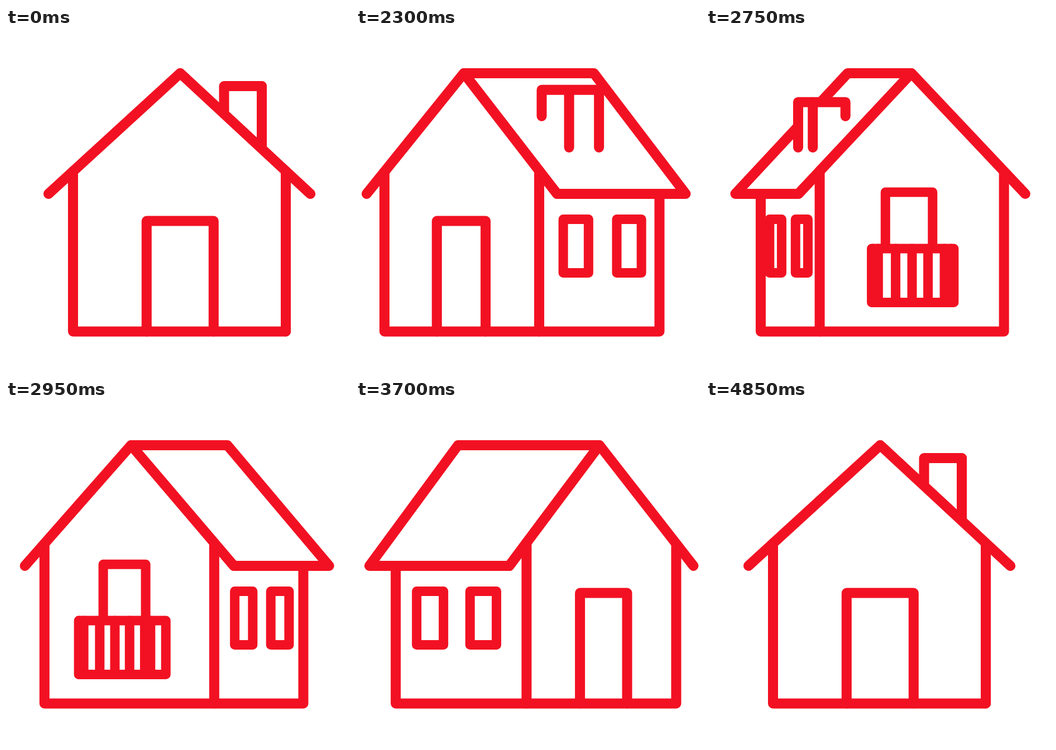
Write an HTML page with a canvas that moves like this. It is 616 px wide and 616 px high and loops after 4.87 s.

```html
<!DOCTYPE html>
<html lang="en">
<head>
<meta charset="utf-8">
<title>Turning house</title>
<style>
  html, body { margin: 0; width: 100%; height: 100%; overflow: hidden; background: #fff; }
  canvas { display: block; width: 616px; height: 616px; }
</style>
</head>
<body>
<canvas id="stage" width="616" height="616"></canvas>
<script>
const g = document.getElementById("stage").getContext("2d");
const LOOP = 4870, REST = 2020;
const RED = "#f21122";
const RIDGE = 81, EAVE = 297, FLOOR = 543.5;
const lerp = (a, b, k) => a + (b - a) * k;

// cubic-bezier(.26, .1, .24, 1)
function ease(x) {
  if (x <= 0) return 0;
  if (x >= 1) return 1;
  const curve = (s, a, b) => 3 * (1 - s) * (1 - s) * s * a + 3 * (1 - s) * s * s * b + s * s * s;
  let lo = 0, hi = 1;
  for (let i = 0; i < 30; i++) {
    const mid = (lo + hi) / 2;
    if (curve(mid, .26, .24) < x) lo = mid; else hi = mid;
  }
  return curve(lo, .1, 1);
}

// Turn in quarters, 0 to 4, advancing in 25 ms steps
function turnAt(ms) {
  if (ms < REST) return 0;
  const step = Math.floor((Math.floor(ms / 10) * 10 - REST) / 25);
  const t = REST + 5 + step * 25;
  if (t >= 4850) return 0;
  // A slight rush as the side comes into view
  const rush = .161 * Math.exp(-(((t - 2550) / 220) ** 2));
  return Math.min(3.9999, 4 * ease((t - 2015) / 2810) + rush);
}

function shape(points, { fill = false, stroke = true, close = false, width = 18 } = {}) {
  g.beginPath();
  points.forEach(([x, y], i) => i ? g.lineTo(x, y) : g.moveTo(x, y));
  if (close) g.closePath();
  if (fill) g.fill();
  g.lineWidth = width;
  if (stroke) g.stroke();
}

const box = (x1, y1, x2, y2) => [[x1, y1], [x2, y1], [x2, y2], [x1, y2]];

function draw(turn) {
  g.fillStyle = "#fff";
  g.strokeStyle = RED;
  g.lineCap = g.lineJoin = "round";
  g.fillRect(0, 0, 616, 616);

  const quarter = Math.floor(turn);
  const m = turn % 2, q = m < 1 ? m : 2 - m;    // 0: gable faces us, 1: side does
  const side = quarter % 2 ? 1 : -1;            // where the near gable stands
  const frontNear = quarter < 1 || quarter > 2;
  const c = 310.5 - 1.5 * Math.min(1, 2 * q);
  const across = q < .5 ? 1 - .656 * q : 1.344 * (1 - q);
  const depth = (half, full) => q < .5 ? half * 2 * q : lerp(half, full, 2 * q - 1);

  const eaveW = 234.5 * across, wallW = 190.5 * across;
  const lean = 1.5 * Math.max(0, 1 - 2 * q);
  const ridge = depth(140, 181);
  const apex = c + lean + side * ridge, farApex = c + lean - side * ridge;
  const eaveMid = c + side * depth(144, 264);
  const wallMid = c + side * depth(144, 223);
  const eaveIn = eaveMid - side * eaveW, eaveOut = eaveMid + side * eaveW;
  const wallIn = wallMid - side * wallW, wallOut = wallMid + side * wallW;
  const farEave = c - side * (depth(133, 264) + eaveW);
  const farMid = c - side * depth(115, 223);
  const farWall = farMid - side * wallW;

  function chimney() {
    const cos = frontNear ? across : -across;
    const sin = (turn < 2 ? 1 : -1) * depth(.7, 1);
    const at = (x, z) => c + x * cos - z * sin;
    const top = turn < 2 ? 104 + 16 * turn : turn < 3 ? 24 + 56 * turn : 104 + 67 * q;
    const [near, far] = turn < 1 ? [60, -32] : turn < 2 ? [-32, 60] : turn < 3 ? [-32, -32] : [0, 0];
    const corner = at(147.5, near), back = at(147.5, far), inner = at(80, near);
    shape([[back, 214], [back, top], [corner, top], [inner, top], [inner, 158]], { fill: true });
    shape([[corner, top], [corner, 214]]);
  }

  function balcony(mid, dir) {
    const at = (a, b) => mid + a * across + b * dir * q;
    const doorTop = 294 + Math.max(0, q - .3) * 20;
    const doorW = lerp(51, 40, q) * across, doorMid = at(-7.8, 8.25);
    shape([[doorMid - doorW, 395], [doorMid - doorW, doorTop],
           [doorMid + doorW, doorTop], [doorMid + doorW, 395]], { width: 17 });
    const posts = [-93, -82, -46, -12, 21, 55, 68].map(a => at(a, 53));
    const ends = [...posts, at(-85, 8), at(85, 8)];
    shape(box(Math.min(...ends), 395, Math.max(...ends), 491.5), { fill: true, close: true, width: 17 });
    posts.forEach(x => shape([[x, 395], [x, 491.5]], { width: 17 }));
  }

  function sideFace() {
    shape(box(farWall, EAVE, wallIn, FLOOR), { fill: true, close: true, stroke: false });
    shape([[farWall, EAVE], [farWall, FLOOR], [wallIn, FLOOR]]);
    const base = turn < 2 ? [.15, .355, .59, .8] : [.16, .365, .568, .77];
    const even = [.145, .355, .645, .855];
    const k = Math.max(0, 2 * q - 1);
    const x = base.map((b, i) => lerp(farWall, wallIn, lerp(b, even[i], k)));
    for (const i of [0, 2])
      shape(box(x[i], 342.5, x[i + 1], 438.5), { close: true, width: 17 });
    shape([[farEave, EAVE], [farApex, RIDGE], [apex, RIDGE], [eaveIn, EAVE]], { fill: true, close: true });
  }

  function gable() {
    const roofY = (x, eave) => {
      const k = (x - apex) / (eave - apex);
      return k > 1 || k < 0 ? EAVE : lerp(RIDGE, EAVE, k);
    };
    const inTop = roofY(wallIn, eaveIn), outTop = roofY(wallOut, eaveOut);
    shape([[wallIn, FLOOR], [wallIn, inTop], [apex, RIDGE], [wallOut, outTop], [wallOut, FLOOR]],
      { fill: true, stroke: false });
    // The outer wall stops under the overhang and turns to meet the roof
    const wallTop = 257 + 20 * Math.max(0, (q - .4) / .36);
    const joint = lerp(apex, eaveOut, Math.min(1, (wallTop - RIDGE) / (EAVE - RIDGE)));
    if (frontNear) {
      const mid = wallMid + 1.3 + .02 * (wallMid - c), w = 60 * across;
      shape([[mid - w, FLOOR], [mid - w, 345.5], [mid + w, 345.5], [mid + w, FLOOR]]);
    } else {
      balcony(wallMid, side);
    }
    shape([[wallIn, inTop], [wallIn, FLOOR], [wallOut, FLOOR], [wallOut, wallTop], [joint, wallTop]]);
    shape([[eaveIn, EAVE], [apex, RIDGE], [eaveOut, EAVE]]);
  }

  if (turn >= 2) chimney();
  if (frontNear) balcony(farMid, -side);
  sideFace();
  if (turn < 2) chimney();
  gable();
}

const start = performance.now();
function tick() {
  draw(turnAt((performance.now() - start) % LOOP));
  requestAnimationFrame(tick);
}
tick();
</script>
</body>
</html>
```
